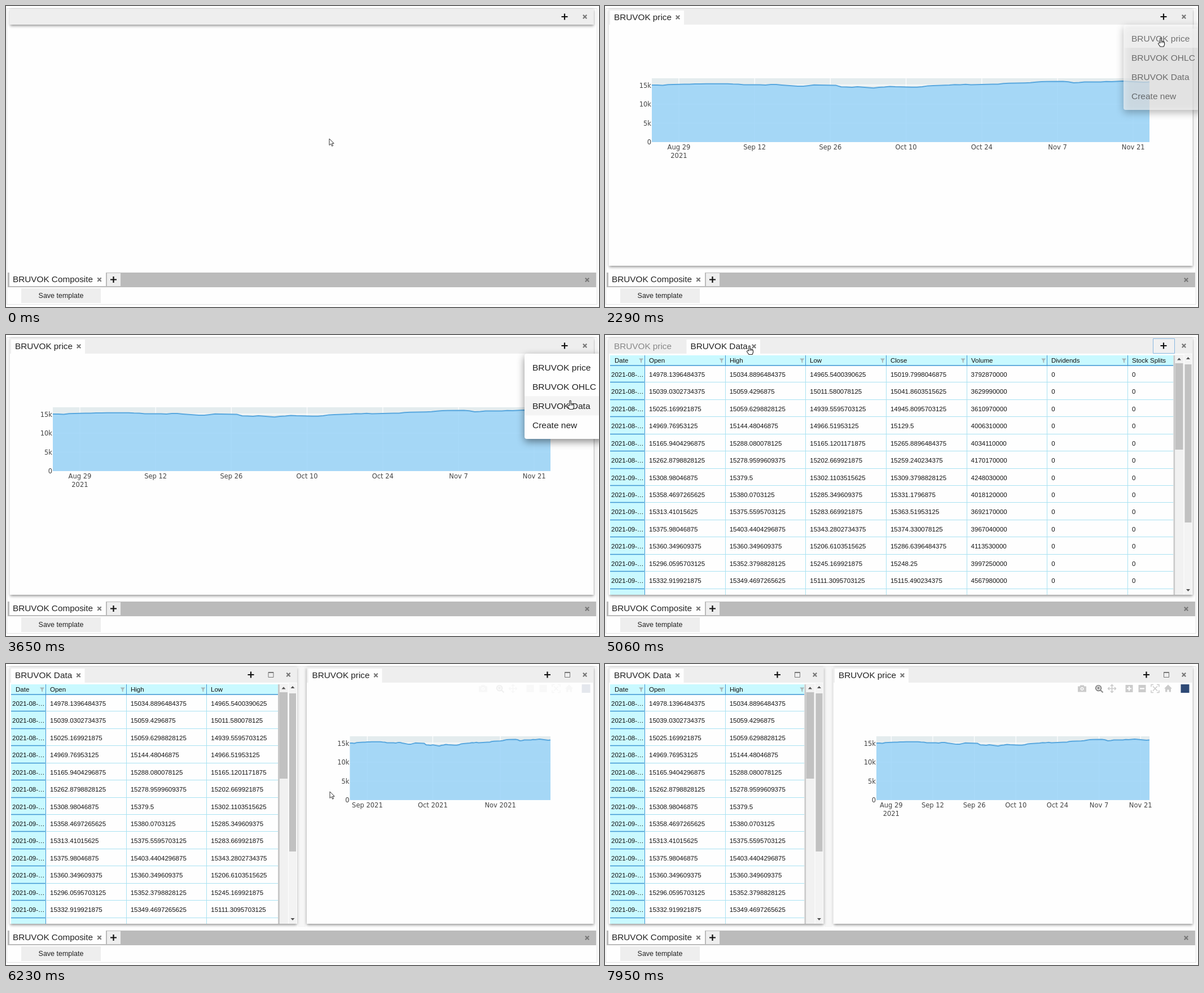
These frames come from a looping animation (1051x533 px, 8000 ms). An HTML page with a canvas:

```html
<!DOCTYPE html>
<html lang="en">
<head>
<meta charset="utf-8">
<title>Dashboard layout</title>
<style>
html, body { margin: 0; width: 100%; height: 100%; overflow: hidden; background: #fff; }
canvas { display: block; }
</style>
</head>
<body>
<canvas id="stage" width="1051" height="533"></canvas>
<script>
const ctx = document.getElementById('stage').getContext('2d');
const SANS = '"Liberation Sans", Arial, sans-serif';
const AXIS = '"DejaVu Sans", Verdana, sans-serif';
const LOOP = 8000, LEFT = 6.5, RIGHT = 1041.5, TOP = 5, BOTTOM = 460;

// Open, high, low, close and volume of each row
const rows = `14978.1396484375 15034.8896484375 14965.5400390625 15019.7998046875 3792870000
15039.0302734375 15059.4296875 15011.580078125 15041.8603515625 3629990000
15025.169921875 15059.6298828125 14939.5595703125 14945.8095703125 3610970000
14969.76953125 15144.48046875 14966.51953125 15129.5 4006310000
15165.9404296875 15288.080078125 15165.1201171875 15265.8896484375 4034110000
15262.8798828125 15278.9599609375 15202.669921875 15259.240234375 4170170000
15308.98046875 15379.5 15302.1103515625 15309.3798828125 4248030000
15358.4697265625 15380.0703125 15285.349609375 15331.1796875 4018120000
15313.41015625 15375.5595703125 15283.669921875 15363.51953125 3692170000
15375.98046875 15403.4404296875 15343.2802734375 15374.330078125 3967040000
15360.349609375 15360.349609375 15206.6103515625 15286.6396484375 4113530000
15296.0595703125 15352.3798828125 15245.169921875 15248.25 3997250000
15332.919921875 15349.4697265625 15111.3095703125 15115.490234375 4567980000`
  .split('\n').map(line => line.split(' '));
const columns = ['Open', 'High', 'Low', 'Close', 'Volume', 'Dividends', 'Stock Splits'];

const laterCloses = [15106, 15038, 15162, 15182, 15044, 14714, 14746, 14897, 15052, 15048,
  14970, 14547, 14512, 14449, 14567, 14255, 14434, 14502, 14654, 14580, 14486, 14466, 14572,
  14823, 14897, 15022, 15129, 15122, 15216, 15090, 15227, 15236, 15236, 15448, 15498, 15596,
  15650, 15812, 15940, 15972, 15982, 15887, 15623, 15704, 15861, 15854, 15974, 15922, 15994,
  16057, 15855, 15775, 15845];
const closes = rows.map(r => +r[3]).concat(laterCloses);
// Trading days counted from a Tuesday; day 13 is a holiday
const days = [...Array(93).keys()].filter(d => d % 7 !== 4 && d % 7 !== 5 && d !== 13);

// Pointer path: time, x, y, shape
const path = [
  [0, 573, 235, 'arrow'], [620, 573, 235, 'arrow'], [680, 585, 229, 'arrow'],
  [850, 585, 229, 'arrow'], [1400, 975, 32, 'hand'], [1480, 986, 20, 'hand'],
  [1650, 989, 21, 'hand'], [1780, 989, 21, 'hand'], [2080, 984, 56, 'hand'],
  [2480, 986, 57, 'hand'], [2720, 992, 32, 'hand'], [2800, 990, 21, 'hand'],
  [3000, 990, 22, 'hand'], [3600, 1000, 116, 'hand'], [4180, 1000, 116, 'arrow'],
  [4830, 265, 24, 'hand'], [4910, 256, 19, 'hand'], [5060, 256, 19, 'hand'],
  [5300, 210, 80, 'arrow'], [5810, 60, 232, 'arrow'], [5960, 60, 232, 'arrow'],
  [6230, 574, 226, 'arrow'], [6730, 545, 200, 'arrow'], [6780, 545, 200, 'arrow'],
  [6870, 525, 202, 'resize'], [7210, 525, 202, 'resize'], [7370, 396.5, 202, 'resize'],
  [7570, 396.5, 202, 'arrow'], [7950, 1062, 232, 'arrow'], [LOOP, 1062, 232, 'arrow']];

const ramp = (t, from, to) => Math.min(1, Math.max(0, (t - from) / (to - from)));
const ease = k => k * k * (3 - 2 * k);

function pointerAt(t) {
  const i = path.findIndex((p, n) => n + 1 === path.length - 1 || t < path[n + 1][0]);
  const [t0, x0, y0, shape] = path[i], [t1, x1, y1] = path[i + 1];
  const k = ease(ramp(t, t0, t1));
  return { x: x0 + (x1 - x0) * k, y: y0 + (y1 - y0) * k, shape };
}

function rect(x, y, w, h, color) { ctx.fillStyle = color; ctx.fillRect(x, y, w, h); }
function frame(x, y, w, h, color) { ctx.strokeStyle = color; ctx.lineWidth = 1; ctx.strokeRect(x, y, w, h); }
function line(x1, y1, x2, y2, color, width = 1) {
  ctx.strokeStyle = color;
  ctx.lineWidth = width;
  ctx.beginPath();
  ctx.moveTo(x1, y1);
  ctx.lineTo(x2, y2);
  ctx.stroke();
}
function text(s, x, y, size, color = '#222', align = 'left', family = SANS) {
  ctx.font = `${size}px ${family}`;
  ctx.textAlign = align;
  ctx.fillStyle = color;
  ctx.fillText(s, x, y);
}
function shape(d, x, y, fill, stroke, width = 1) {
  const p = new Path2D(d);
  ctx.save();
  ctx.translate(x, y);
  if (fill) { ctx.fillStyle = fill; ctx.fill(p); }
  if (stroke) { ctx.strokeStyle = stroke; ctx.lineWidth = width; ctx.stroke(p); }
  ctx.restore();
}
function clipped(x, y, w, h, draw) {
  ctx.save();
  ctx.beginPath();
  ctx.rect(x, y, w, h);
  ctx.clip();
  draw();
  ctx.restore();
}
function shadowed(blur, dy, alpha, draw) {
  ctx.save();
  ctx.shadowColor = `rgba(0,0,0,${alpha})`;
  ctx.shadowBlur = blur;
  ctx.shadowOffsetY = dy;
  draw();
  ctx.restore();
}

const cross = (x, y) => shape('M-3.2-3.2L3.2 3.2M3.2-3.2L-3.2 3.2', x, y, null, '#777', 2.2);
const plus = (x, y) => shape('M-5.5 0H5.5M0-5.5V5.5', x, y, null, '#111', 2.2);

function tab(x, label, closeX) {
  rect(x, 8, closeX + 11 - x, 26, '#fefefe');
  text(label, x + 7, 25, 15.3);
  cross(closeX, 20);
}

function panel(left, right, { empty, split, plusState } = {}) {
  shadowed(5, 2, .45, () => rect(left, TOP, right - left, empty ? 28 : BOTTOM - TOP, '#fefefe'));
  rect(left, TOP, right - left, 28, '#eee');
  cross(right - 15.5, 19);
  if (split) {
    frame(right - 51, 14.5, 9, 9, '#777');
    line(right - 51, 15, right - 42, 15, '#777', 2);
  }
  if (plusState) {
    rect(971, 6, 39, 27, '#f1f1f1');
    frame(971.5, 6.5, 38, 26, plusState === 'focus' ? '#86b7e0' : '#e3e3e3');
  }
  plus(right - (split ? 82 : 51.5), 19);
}

function modebar(right, alpha, logo, homeHover) {
  if (alpha <= 0) return;
  const icon = '#cbcbcb', at = right - RIGHT, y = 43.5;
  ctx.save();
  ctx.globalAlpha = alpha;
  shape('M-7.5-4H-4L-3-6H3L4-4H7.5V6H-7.5ZM0-2.5A3 3 0 1 0 .1-2.5Z', at + 845.5, y, icon);
  shape('M0 0A1.5 1.5 0 1 0 .1 0Z', at + 845.5, y - 1, icon);
  shape('M-1-5.5A4.7 4.7 0 1 0-.9-5.5M2.5 2.5L7 7M-3.5-1H1.5M-1-3.5V1.5', at + 875.5, y, null, '#8e8e8e', 2.2);
  shape('M-6 0H6M0-6V6M-4.5-2.5L-7 0L-4.5 2.5M4.5-2.5L7 0L4.5 2.5M-2.5-4.5L0-7L2.5-4.5M-2.5 4.5L0 7L2.5 4.5',
    at + 898.5, y, null, icon, 1.6);
  for (const x of [929, 952]) rect(at + x - 6.5, y - 6.5, 13, 13, icon);
  shape('M-4 0H4M0-4V4', at + 929, y, null, '#fff', 2.2);
  shape('M-4 0H4', at + 952, y, null, '#fff', 2.2);
  shape('M-4-4L4 4M4-4L-4 4M-7-3V-7H-3M3-7H7V-3M7 3V7H3M-3 7H-7V3', at + 975, y, null, icon, 1.5);
  shape('M-7 0L0-7L7 0H5V6H1.5V2H-1.5V6H-5V0Z', at + 998, y, homeHover ? '#8e8e8e' : icon);
  rect(at + 1020.5, 36, 15, 15, logo);
  ctx.restore();
}

function chart(left, right) {
  const x0 = left + 76.5, x1 = right - 76.5, width = x1 - x0, base = 241;
  const dayX = d => x0 + d * width / 92, valueY = v => base - v * 33.6 / 5000;
  rect(x0, 128, width, base - 128, '#e4ecee');
  for (let k = 0; k < 4; k++) {
    const y = valueY(k * 5000);
    line(x0, y, x1, y, '#fff', 1.2);
    text(k ? k * 5 + 'k' : '0', x0 - 1, y + 4.3, 11.5, '#444', 'right', AXIS);
  }
  const ticks = width > 400
    ? 'Aug 29,Sep 12,Sep 26,Oct 10,Oct 24,Nov 7,Nov 21'.split(',').map((s, i) => [5 + 14 * i, s])
    : [[8, 'Sep 2021'], [38, 'Oct 2021'], [69, 'Nov 2021']];
  for (const [d, label] of ticks) {
    line(dayX(d), 128, dayX(d), base, '#fff', 1.2);
    text(label, dayX(d), 254, 11.5, '#444', 'center', AXIS);
  }
  if (width > 400) text('2021', dayX(5), 268.5, 11.5, '#444', 'center', AXIS);

  const curve = new Path2D();
  days.forEach((d, i) => curve.lineTo(dayX(d), valueY(closes[i])));
  const area = new Path2D(curve);
  area.lineTo(x1, base);
  area.lineTo(x0, base);
  ctx.fillStyle = 'rgba(154,212,248,.85)';
  ctx.fill(area);
  ctx.strokeStyle = '#58a7de';
  ctx.lineWidth = 2;
  ctx.lineJoin = 'round';
  ctx.stroke(curve);
}

function table(right) {
  const step = 142.65, rowStep = 30.43, edge = right - 34, dark = '#3e95d2', light = '#a9e2f2';
  const columnX = c => 70 + c * step;
  const funnel = x => shape('M-4-4H4L1 0V4L-1 3V0Z', x, 45.5, '#a9b7ba');
  clipped(9, 35, edge - 9, BOTTOM - 35, () => {
    rect(9, 36, edge - 9, 18, '#c9f9ff');
    rect(9, 54, 61, BOTTOM - 54, '#c9f9ff');
    text('Date', 17, 49, 11.5, '#111');
    funnel(64);
    columns.forEach((name, c) => {
      const x = Math.round(columnX(c)) + .5;
      line(x, 54, x, BOTTOM, c ? light : dark);
      line(x, 36, x, 54, dark);
      text(name, x + 7.5, 49, 11.5, '#111');
      funnel(columnX(c + 1) - 6);
    });
    rows.forEach((row, r) => {
      const y = 54 + r * rowStep, lineY = Math.round(y + rowStep) - .5;
      line(70, lineY, edge, lineY, light);
      line(9, lineY, 70, lineY, dark, 1.3);
      text(r < 6 ? '2021-08-…' : '2021-09-…', 11, y + 20, 11.5, '#111');
      [...row, '0', '0'].forEach((v, c) => text(v, columnX(c) + 8, y + 20, 11.5, '#111'));
    });
    line(9, 54, edge, 54, dark, 1.3);
  });
  const arrow = (x, y, dir) => shape(`M-3.5 ${2 * dir}H3.5L0 ${-2 * dir}Z`, x, y, '#505050');
  rect(edge, 36, 3, BOTTOM - 36, '#c9c9c9');
  rect(right - 31, 35, 15, BOTTOM - 35, '#f1f1f1');
  rect(right - 31, 50, 14, 153, '#c1c1c1');
  arrow(right - 24, 42.5, 1);
  rect(right - 15, 34, 14, BOTTOM - 34, '#f3f3f3');
  rect(right - 14, 52, 12, 280, '#c1c1c1');
  arrow(right - 8, 41, 1);
  arrow(right - 8, 452, -1);
}

function tablePanel(right, split) {
  panel(LEFT, right, { split });
  tab(9, 'BRUVOK Data', 128.5);
  table(right);
}
function chartPanel(left, right, options) {
  panel(left, right, options);
  tab(left + 2.5, 'BRUVOK price', left + 122.5);
  chart(left, right);
}

function menu(alpha, pointer) {
  if (alpha <= 0) return;
  ctx.save();
  ctx.globalAlpha = alpha;
  shadowed(14, 5, .45, () => {
    ctx.fillStyle = '#fefefe';
    ctx.beginPath();
    ctx.roundRect(919, 33, 150, 151, 4);
    ctx.fill();
  });
  ['BRUVOK price', 'BRUVOK OHLC', 'BRUVOK Data', 'Create new'].forEach((label, i) => {
    const y = 40 + 34.2 * i;
    if (pointer.y >= y && pointer.y < y + 34) rect(919, y, 132, 34, '#f4f4f4');
    text(label, 933, y + 22.5, 15.5);
  });
  ctx.restore();
}

function tooltip() {
  shape('M0 0L5 5H-5Z', 998, 53, '#969390');
  ctx.beginPath();
  ctx.roundRect(934, 58, 81, 27, 2);
  ctx.fillStyle = '#969390';
  ctx.fill();
  text('Reset axes', 974.5, 76, 11.5, '#fff', 'center', AXIS);
}

function drawPointer({ x, y, shape: kind }) {
  if (kind === 'arrow') {
    shape('M0 0V11.5L2.8 9L4.7 13.2L6.6 12.3L4.7 8.3H8.2Z', x, y, '#fff', '#333');
  } else if (kind === 'hand') {
    shape('M-1.2 9V1.2Q-1.2 0 0 0T1.2 1.2V5.5L5 6.5Q6.5 7 6.5 9V12L5 15.5H-1L-4.5 10.5Q-4.5 8.5-3 8.5Z',
      x, y, '#fff', '#222', 1.1);
    shape('M1.2 5.5V9M3 6.2V9M4.8 6.6V9', x, y, null, '#222', .8);
  } else {
    shape('M-1.5-7V7M1.5-7V7M-2 0H-9M-6-3L-9 0L-6 3M2 0H9M6-3L9 0L6 3', x, y, null, '#222', 1.2);
  }
}

function footer() {
  rect(3, 472, 1043, 26, '#bbb');
  rect(6, 472, 171, 24, '#fefefe');
  text('BRUVOK Composite', 12, 489, 15.3);
  cross(165.5, 484.5);
  rect(179, 473, 24, 23, '#eee');
  plus(190.5, 484.5);
  cross(1030, 485);
  rect(27, 500, 141, 26, '#eee');
  text('Save template', 97.5, 517, 12.5, '#222', 'center');
}

function dragPreview(t, p) {
  if (t > 5140) {
    const width = t > 5260 ? 517 : RIGHT - LEFT;
    rect(LEFT, TOP, width, BOTTOM - TOP, 'rgba(0,0,0,.1)');
    ctx.setLineDash([4, 3]);
    frame(LEFT, TOP + .5, width, BOTTOM - TOP, '#bbb');
    ctx.setLineDash([]);
  }
  ctx.save();
  ctx.globalAlpha = .9;
  ctx.translate(p.x - LEFT, p.y - TOP);
  clipped(LEFT, TOP, 300, 200, () => tablePanel(306.5, false));
  ctx.restore();
}

function workspace(t, p) {
  const overPlus = p.x > 971 && p.x < 1010 && p.y < 33;
  if (t < 2260) {
    panel(LEFT, RIGHT, { empty: true, plusState: t < 1720 && overPlus && 'hover' });
  } else if (t < 4080) {
    const focused = t > 2420 && t < 2880;
    chartPanel(LEFT, RIGHT, { plusState: focused && 'focus' });
    const homeHover = t > 2600 && t < 2775;
    modebar(RIGHT, ramp(t, 2380, 2500) - ramp(t, 3340, 3500), '#777', homeHover);
    if (homeHover) tooltip();
  } else if (t < 5080) {
    panel(LEFT, RIGHT, { plusState: t > 4280 && 'focus' });
    text('BRUVOK price', 16, 25, 15.3, '#888');
    tab(144.5, 'BRUVOK Data', 264);
    table(RIGHT);
  } else if (t < 5970) {
    chartPanel(LEFT, RIGHT);
    dragPreview(t, p);
  } else {
    const resized = t >= 7570, split = resized ? 396 : 524.5;
    rect(split - 6.5, TOP, 13, 461, '#f6f6f6');
    tablePanel(split - 8.5, true);
    chartPanel(split + 8.5, RIGHT, { split: true });
    const shown = resized ? ramp(t, 7640, 7820) : ramp(t, 6200, 6450) - ramp(t, 6780, 6950);
    modebar(RIGHT, shown, '#2f4a76');
    if (t >= 7210 && !resized) rect(p.x - 6.5, 11, 13, 453, 'rgba(190,190,190,.6)');
  }
  menu(ramp(t, 1720, 1900) - ramp(t, 2210, 2420), p);
  menu(ramp(t, 2880, 3060) - ramp(t, 4060, 4280), p);
}

function render() {
  const t = performance.now() % LOOP, pointer = pointerAt(t);
  rect(0, 0, 1051, 533, '#fff');
  rect(2, 4, 1045, 524, '#fefefe');
  frame(1.5, 4.5, 1046, 524, '#e2e2e2');
  footer();
  workspace(t, pointer);
  drawPointer(pointer);
  requestAnimationFrame(render);
}
render();
</script>
</body>
</html>
```
